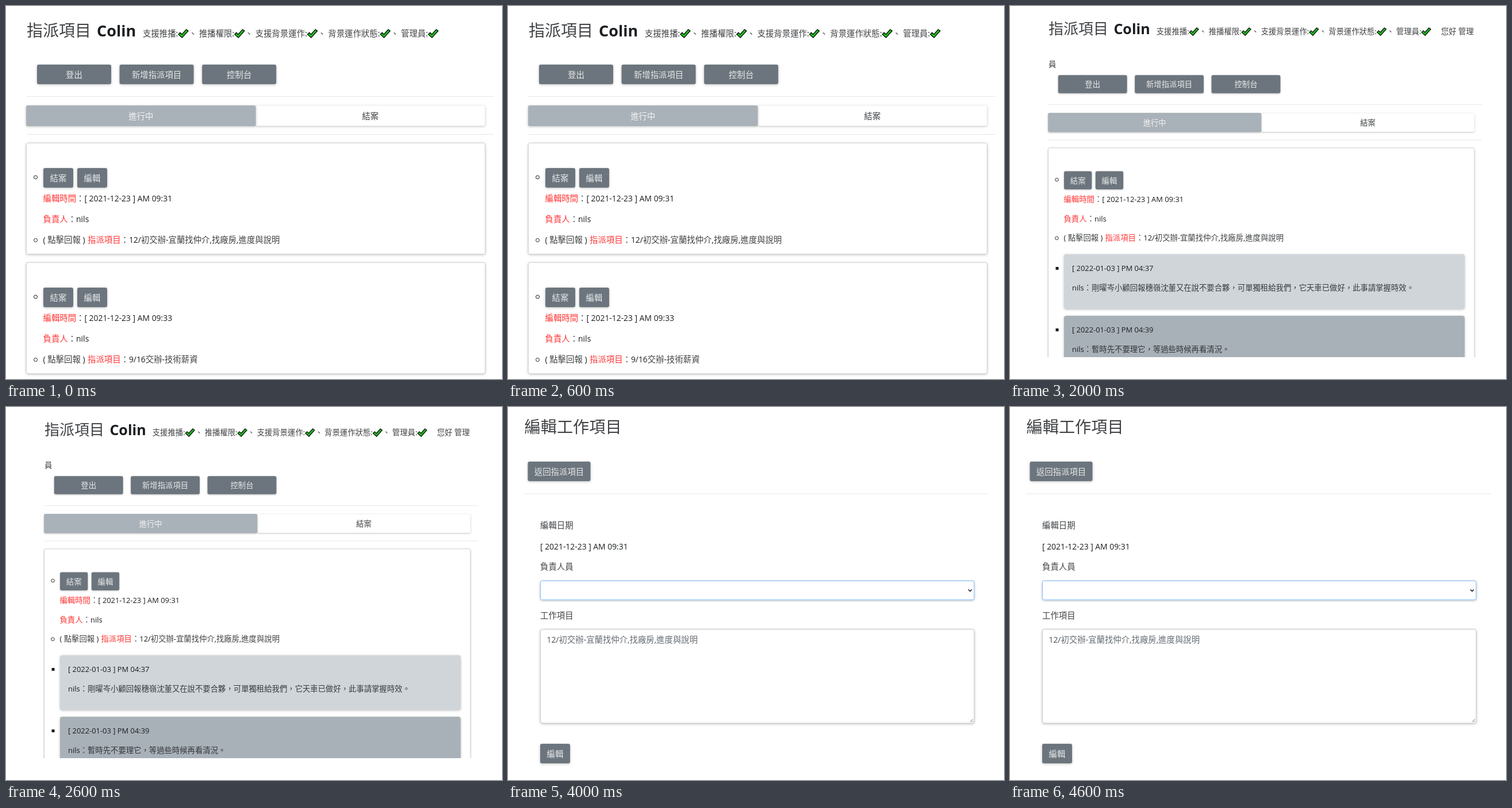
These frames come from a looping animation (863 by 649 pixels, 5 s). An HTML page:

```html
<!DOCTYPE html>
<html lang="zh-Hant">
<head>
<meta charset="utf-8">
<title>指派項目</title>
<style>
  html, body { margin: 0; width: 100%; height: 100%; overflow: hidden; background: #fff; }
  svg { display: block; width: 863px; height: 649px; }
  text { white-space: pre; }
  .ui { font-family: 'Open Sans', 'Noto Sans CJK TC', 'Noto Sans CJK', sans-serif; font-weight: 300; }
  .ui .l { font-size: .965em; font-weight: 400; }
  .ui .b .l { font-weight: 700; }
  .table { font-family: 'Liberation Sans', 'Noto Sans CJK TC', 'Noto Sans CJK', sans-serif; font-weight: 300; }
  .table .l, .table .m { font-weight: 400; }
  .ui text, .table text { fill-opacity: .84; }
  .ui .l, .table .l, .table .m { fill-opacity: 1; }
  .phone { font-family: Roboto, 'Noto Sans CJK TC', 'Noto Sans CJK', sans-serif; }
  .thin { font-weight: 300; }
  .medium { font-weight: 500; }
  .sh { filter: drop-shadow(0 1.5px 2px rgba(0, 0, 0, .26)); }
</style>
</head>
<body>
<svg id="stage" viewBox="0 0 863 649" xmlns="http://www.w3.org/2000/svg"></svg>
<script>
const INK = '#1b1e21', GREY = '#6c757d', PALE = '#aab2b9', RED = '#ff1010', DIM = '#8c8c8c';
const USER = 'nils', TASK = '12/初交辦-宜蘭找仲介,找廠房,進度與說明';

// Text is placed by the vertical middle of its line.
const text = (x, y, s, size = 14.4, fill = INK, cls = '', anchor = 'start') =>
  `<text x="${x}" y="${y + size * .35}" font-size="${size}" fill="${fill}" class="${cls}" text-anchor="${anchor}">` +
  s.replace(/[ -~]+/g, run => `<tspan class="l">${run}</tspan>`) + '</text>';
const mid = (x, y, s, size, fill, cls) => text(x, y, s, size, fill, cls, 'middle');
const rect = (x, y, w, h, fill, r = 0, more = '') =>
  `<rect x="${x}" y="${y}" width="${w}" height="${h}" rx="${r}" fill="${fill}" ${more}/>`;
const disc = (x, y, r, fill, more = '') => `<circle cx="${x}" cy="${y}" r="${r}" fill="${fill}" ${more}/>`;
const line = (d, stroke, w = 1, more = '') =>
  `<path d="${d}" fill="none" stroke="${stroke}" stroke-width="${w}" ${more}/>`;
const at = (x, y, body, scale = 1) => `<g transform="translate(${x} ${y}) scale(${scale})">${body}</g>`;
const rule = (x1, x2, y) => rect(x1, y, x2 - x1, 1, '#e6e6e6');
const clip = (id, x, y, w, h, body) =>
  `<clipPath id="${id}">${rect(x, y, w, h, '#000')}</clipPath><g clip-path="url(#${id})">${body}</g>`;

const button = (x, y, w, h, label, size = 14.4, fill = GREY, ink = '#fff') =>
  rect(x, y, w, h, fill, 3, 'class="sh"') + mid(x + w / 2, y + h / 2 + .8, label, size, ink);
const field = (x, y, w, h, stroke = '#d8d8d8') =>
  rect(x, y, w, h, '#fff', 3, `stroke="${stroke}" class="sh"`);

const tick = (x, y, s, dark) => at(x, y,
  `<path d="M0 .08 L.2 -.12 L.4 .08 L.88 -.46 L1.1 -.3 L.42 .46Z" fill="${dark ? INK : '#22bb22'}"
   stroke="${dark ? 'none' : '#0a1a0a'}" stroke-width=".09" stroke-linejoin="round"/>`, s);
const cross = (x, y, r, outlined) => {
  const d = `M${x - r} ${y - r}L${x + r} ${y + r}M${x + r} ${y - r}L${x - r} ${y + r}`;
  return (outlined ? line(d, '#1a0a0a', 5.6, 'stroke-linecap="square"') : '') +
    line(d, outlined ? '#f03a17' : '#e02f3d', outlined ? 3.4 : 2.6, 'stroke-linecap="square"');
};

// A row of "label: mark" pairs; labels ending in ! carry a cross.
function status(x, y, em, labels, dark, openEnd) {
  const markWidth = dark ? .95 : 1.25;
  return labels.map((raw, i) => {
    const label = raw.replace('!', '');
    const markX = x + (label.length + .3) * em;
    const last = i === labels.length - 1 && !openEnd;
    const out = text(x, y, label + ':', em) +
      (raw === label ? tick(markX, y, em * (dark ? .85 : 1.08), dark) : cross(markX + em * .62, y, em * .42)) +
      (last ? '' : text(markX + markWidth * em, y, '、', em));
    x += em * (label.length + markWidth + 1.55);
    return out;
  }).join('');
}

// ---- task list -------------------------------------------------------
const listHead = () => text(36, 43, '指派項目', 28) + text(158, 43, 'Colin', 28, INK, 'b') +
  status(238, 48, 14.4, ['支援推播', '推播權限', '支援背景運作', '背景運作狀態', '管理員']);

const listBar = () =>
  ['登出', '新增指派項目', '控制台'].map((s, i) => button(54 + i * 143.6, 102, 129, 34, s)).join('') +
  rule(36, 848, 157) +
  rect(434.5, 173.5, 399, 35, '#fff', 3, 'class="sh"') + mid(634, 192, '結案') +
  button(35, 173, 399.5, 36, '進行中', 14.4, PALE) + rule(36, 848, 223);

const ring = y => disc(51.5, y, 3, 'none', `stroke="${INK}"`);
const card = (y, h, time, task) => at(0, y,
  rect(35.5, .5, 798, h, '#fff', 3, 'stroke="#d6d6d6" class="sh"') +
  ring(60) + button(65, 44, 52, 34, '結案') + button(124, 44, 52, 34, '編輯') +
  text(64.5, 97, '編輯時間', 14.4, RED) + text(122, 97, `：[ 2021-12-23 ] AM ${time}`) +
  text(64.5, 133, '負責人', 14.4, RED) + text(107.7, 133, `：${USER}`) +
  ring(169.5) + text(64.5, 169, '( 點擊回報 )') +
  text(142, 169, '指派項目', 14.4, RED) + text(199.5, 169, `：${task}`));

const listPage = () => listHead() + listBar() +
  card(238, 193, '09:31', TASK) + card(446, 193, '09:33', '9/16交辦-技術薪資');

const note = (y, fill, time, message) =>
  rect(79.5, y + 22, 5, 5, INK) + rect(94, y, 697, 95, fill, 4, 'class="sh"') +
  text(108, y + 24.5, `[ 2022-01-03 ] PM ${time}`, 13.37) +
  text(108, y + 58, `${USER}：${message}`, 13.37);

const detailPage = () => at(33.6, 0, listHead(), .929) +
  text(750, 44.5, '您好 管理', 13.37) + text(67, 101, '員', 13.37) +
  clip('detail', 0, 60, 863, 551,
    at(33.6, 25.4, listBar() + card(238, 500, '09:31', TASK), .929) +
    note(432, '#d0d5da', '04:37', '剛曜岑小顧回報穗嶺沈董又在說不要合夥，可單獨租給我們，它天車已做好，此事請掌握時效。') +
    note(539, '#a9b1b8', '04:39', '暫時先不要理它，等過些時候再看清況。'));

// ---- report ----------------------------------------------------------
function reportPage() {
  const cols = [33.5, 94.5, 150.5, 503.5, 791.5, 831];
  const rows = [146.5, 245, 393.5, 449, 504.5, 560, 615.5, 671];
  const tasks = [TASK, '9/16交辦-技術薪資', '10/初交辦-曜岑三階段管制清單', '10/初交辦-曜岑異常清單', '12/17交辦-值夜值班增修', ''];
  const stack = (x, y, parts, cls) => parts.map((s, i) =>
    text(x, y + (i - (parts.length - 1) / 2) * 21.7, s, 14.4, '#111', cls)).join('');
  const fills = rows.slice(0, -1).map((y, i) =>
    rect(33.5, y, 797.5, rows[i + 1] - y, i === 0 ? '#a9b1b8' : i % 2 ? '#fff' : '#dcdcdc')).join('');
  const grid = line(cols.map(x => `M${x} 146V671`).join('') + rows.map(y => `M33 ${y}H831.5`).join(''), '#111');
  const heads = [['負責人', '員'], ['發布日', '期'], ['內容'], ['詳細內容'], ['是', '否', '結', '案']]
    .map((s, i) => stack(cols[i] + 6.5, 195.5, s, 'm')).join('');
  const body = tasks.map((task, i) => {
    const y = (rows[i + 1] + rows[i + 2]) / 2 + .5;
    const dates = stack(100.5, i === 5 ? 649 : y, ['2021-', '12-23']);
    return dates + (i === 5 ? '' : text(39.5, y, USER, 14.4, '#111') + text(157, y, task) + cross(807, y, 4.6, true));
  }).join('');
  const details = [
    [261.5, `[2022-01-03 16:37:44]${USER}:剛曜岑小顧回報`], [283.5, '穗嶺沈董又在說不要合夥，可單獨租給我'],
    [305, '們，它天車已做好，此事請掌握時效。'], [341, `[2022-01-03 16:39:01]${USER}:暫時先不要理`],
    [362.5, '它，等過些時候再看清況。'], [632, '[2022-01-03 16:32:04]halden:請回報到底']
  ].map(([y, s]) => text(510, y, s, 14.4, '#111')).join('');
  return '<g class="ui">' + text(34, 21, '報表', 28) +
    ['返回工作項目', '匯出Excel', '匯出Pdf'].map((s, i) => button(51 + i * 143.8, 83.5, 129.5, 34, s)).join('') +
    field(482.5, 81, 129.5, 34) + text(494, 98.5, '搜尋', 14.4, '#7d858c') + '</g>' +
    clip('report', 0, 140, 863, 497.5, fills + grid + heads + body + details);
}

// ---- edit form -------------------------------------------------------
const editPage = () => text(28.5, 35, '編輯工作項目', 28.2) +
  button(34.5, 95, 109, 34, '返回指派項目') + rule(27, 836, 150.5) +
  text(56, 206, '編輯日期') + text(56, 242.5, '[ 2021-12-23 ] AM 09:31') + text(56, 278, '負責人員') +
  field(56.5, 302.5, 754.5, 33, '#80bdff') + line('M801 317.5l3 3 3-3', '#222', 1.6) +
  text(56, 362.5, '工作項目') + field(56.5, 387, 754.5, 163, '#ccc') + text(67.5, 405, TASK, 14.4, '#495057') +
  line('M804 548l5-5M807 548l2-2', '#777') + button(56, 586, 52, 34, '編輯');

// ---- phones ----------------------------------------------------------
const alarm = (x, y) => disc(x, y, 3.3, 'none', 'stroke="#fff"') +
  line(`M${x} ${y - 2}v2.3h1.5M${x - 4.2} ${y - 2.5}l2-1.8M${x + 4.2} ${y - 2.5}l-2-1.8`, '#fff', .9);
const signal = (x, y) => text(x, y - 2, '4G', 5, '#fff', 'medium') +
  [0, 1, 2, 3].map(i => rect(x + 7 + i * 2.7, y + 1 - i * 1.6, 1.9, 2.5 + i * 1.6, '#fff')).join('') +
  rect(x + 20.5, y - 3.5, 15, 7, 'none', 2, 'stroke="#fff"') + rect(x + 36, y - 1.3, 1.3, 2.6, '#fff') +
  mid(x + 28, y, '70', 6, '#fff', 'medium');

const login = () => text(31.5, 127, '指派項目', 21.5) +
  status(38, 188.5, 10.75, ['支援推播', '推播權限', '支援背景運作'], true, true) +
  status(38, 205, 10.75, ['背景運作狀態', '管理員!'], true) +
  field(49, 228, 225, 26) + text(57, 240, '帳號', 10.8, '#757575') +
  field(49, 267, 225, 26) + text(57, 280, '密碼', 10.8, '#757575') +
  button(49, 306.5, 225.5, 26, '登入', 10.8) +
  rect(49.5, 349.5, 10.5, 10.5, '#fff', 2, 'stroke="#666"') + text(62.5, 354, '記住帳號與密碼', 10.8) +
  rule(31, 279, 379.5) + rect(155, 391.5, 124, 34, '#fff', 3, 'class="sh"') + mid(217, 408, '結案', 10.8) +
  button(31, 391.5, 124, 34, '進行中', 10.8, PALE, '#eee') + rule(31, 279, 437);

const loginPhone = () => text(35, 72, '上午8:47 | 23.0KB/s', 9.4, '#fff', 'medium') + alarm(122, 72) +
  disc(135, 72, 3.5, '#fff') + signal(236, 72) +
  '<path d="M21.5 453.5V91q0-11 11-11H277.5q11 0 11 11V453.5Z" fill="#fff"/>' + login();

const installPhone = () => text(307.5, 72, '上午8:46 | 194KB/s', 9.4, '#fff', 'medium') + alarm(392, 72) +
  '<path d="M400 74.5a2 2 0 0 1 1-3.6a3 3 0 0 1 5.5 0a2 2 0 0 1 1 3.6Z" fill="#fff"/>' + signal(507, 72) +
  rect(295.5, 82, 264, 37, '#1b1b1b') +
  line('M305.5 100l5-5 5 5M307 99v6h7v-6', DIM, 1.3) +
  rect(336.5, 98.5, 7, 6, DIM, 1) + line('M338 99v-2a2 2 0 0 1 4 0v2', DIM, 1.2) +
  text(350, 100, 't402x.github.io', 15.4, '#707070') + line('M475.5 99.5h11M481 94v11', DIM, 1.4) +
  rect(508, 94.5, 10.5, 10.5, 'none', 2, `stroke="${DIM}" stroke-width="1.3"`) + mid(513.3, 99.8, '3', 7, DIM) +
  [95, 99.5, 104].map(y => disc(540.5, y, 1.2, DIM)).join('') +
  rect(295.5, 119, 264, 365, '#fff') + at(273, 37.3, login()) + rect(295.5, 119, 264, 365, '#000', 0, 'opacity=".61"') +
  rect(301, 279, 251, 137, '#292c35', 14) +
  text(317.5, 304, '安裝應用程式', 20.8, '#f1f1f4') + rect(318, 336, 24, 24, '#dd0031') +
  text(349, 346, 'Zumek', 19, '#ececf0') + text(349, 367.5, 'quilm7t402x.github.io', 13.4, '#c6c7cc') +
  text(439.5, 398, '取消', 13, '#a9c4f7') + text(504, 398, '安裝', 13, '#a9c4f7');

const sun = (x, y, r) => disc(x, y, r * .5, '#fff') + [...Array(8)].map((_, i) => {
  const a = i * Math.PI / 4;
  return disc(x + r * Math.cos(a), y + r * Math.sin(a), r * .16, '#fff');
}).join('');
const chevron = (y, up) => disc(815, y, 8, '#0a0a0a') +
  line(up ? `M811.5 ${y + 2}l3.5-3.5 3.5 3.5` : `M811.5 ${y - 2}l3.5 3.5 3.5-3.5`, '#fff', 1.4);
const panel = (y, h) => rect(582, y, 252, h, '#252525', 9);
const bell = (x, y, fill) => `<path d="M${x - 4} ${y + 2}q1.2-1 1.2-3a2.8 2.8 0 0 1 5.6 0q0 2 1.2 3ZM${x - 1} ${y + 3}h2v1h-2Z" fill="${fill}"/>`;

const shadePhone = () => `<defs>
  <linearGradient id="wall" x2="0" y2="1"><stop stop-color="#777473"/><stop offset=".2" stop-color="#8b8888"/>
  <stop offset=".5" stop-color="#aaa9a9"/><stop offset="1" stop-color="#b3b2b2"/></linearGradient>
  <radialGradient id="blush"><stop stop-color="#b88a8c" stop-opacity=".4"/><stop offset="1" stop-color="#b88a8c" stop-opacity="0"/></radialGradient></defs>` +
  rect(574, 62, 267.5, 526, 'url(#wall)') + disc(632, 542, 44, 'url(#blush)') +
  text(582, 83, '8:48', 29.5, '#fff', 'thin') + text(582, 106, '11月1日 週二 上午', 9.6, '#fff') +
  text(582, 119.5, '青嶼電訊', 9.2, '#fff') + text(747.5, 119.5, '0.2KB/s', 9.4, '#fff', 'medium') +
  alarm(787, 119.5) + signal(795, 119.5) +
  disc(824, 98, 4.3, 'none', 'stroke="#fff" stroke-width="1.7"') +
  disc(824, 98, 5.5, 'none', 'stroke="#fff" stroke-width="1.5" stroke-dasharray="2.2 2.12"') + disc(824, 98, 1.2, '#fff') +
  panel(133, 85) + [613, 660, 708, 755, 802].map((x, i) => disc(x, 164, 17, i < 2 ? '#0c78d2' : '#3f3f3f')).join('') +
  line('M608 166a5.5 5.5 0 1 1 3 3.5M610.5 164.5h5v3.5h-5zM611.5 164v-2a1.5 1.5 0 0 1 3 0v2', '#fff', 1.1) +
  line('M657.5 169v-10l-2 2M662.5 159v10l2-2', '#fff', 1.3) +
  line('M702 162a8.5 8.5 0 0 1 12 0M704 164.5a5.6 5.6 0 0 1 8 0M706 167a2.8 2.8 0 0 1 4 0', '#fff', 1.4) + disc(708, 168.5, 1.1, '#fff') +
  rect(749.5, 159.5, 11, 9, '#fff', 2) + rect(751, 163, 8, 1.6, '#3f3f3f') +
  line('M799 161h6l-1.5 3v5h-3v-5zM802 157v2M797.5 158l1.3 1.3M806.5 158l-1.3 1.3', '#fff', 1.1) +
  rect(592, 195, 232, 1, '#3b3b3b') + disc(597, 206.5, 5, '#777') + line('M597 203.5v3l2 1', '#2a2a2a') +
  text(607, 206.5, '今日:897.7MB', 10.7, '#9b9b9b') + text(694, 206.5, '本月:897.7...', 10.7, '#9b9b9b') +
  text(771.5, 206.5, '設定套餐 >', 10.9, '#9b9b9b') +
  panel(226, 30) + '<path d="M632 226H591q-9 0-9 9v12q0 9 9 9h41Z" fill="#a2a2a2"/>' + sun(597, 241, 4.6) + sun(819, 241, 6) +
  rect(694, 266.5, 27, 3, '#d0d0d0', 1.5) +
  panel(279, 91) + disc(601, 298, 8.3, '#fff') + bell(601, 298, '#222') +
  text(617, 298.5, 'Zumek・quilm7t4…', 10.2, '#858585') + text(711, 298.5, '・現在', 10.2, '#858585') + bell(750, 298.5, '#858585') +
  text(617, 324, '需求通知', 15.5, '#fff') + text(617, 348, 'ttt1', 12.8, '#858585') +
  disc(779, 306, 16.5, '#9a9a9a') + mid(779, 306.5, 'Q', 13.5, '#fff', 'medium') + chevron(298, true) +
  panel(375, 64) + disc(601, 406, 8.3, '#fff') + disc(601, 406, 4.5, '#333') +
  text(617, 399, 'Zumek', 15.5, '#fff', 'medium') + text(617, 417.5, '輕觸即可複製這個應用程式..', 13.4, '#858585') + chevron(406) +
  panel(443, 64) + disc(601, 475, 8.3, '#fff') + '<path d="M601 470l5 9h-10Z" fill="#222"/>' + rect(600.5, 473.5, 1, 3, '#fff') +
  text(617, 467.5, '敬請處理帳戶..', 15.5, '#fff', 'medium') + text(727, 469.5, '・3天', 10.2, '#858585') +
  text(617, 487, '728306194@mexo.tvb...', 13, '#858585') + disc(779, 475, 15, '#fff') + disc(779, 475, 9.5, '#4285f4') + chevron(475) +
  disc(707.5, 556.5, 17.5, '#3a3a3a') + line('M703.5 552.5l8 8M711.5 552.5l-8 8', '#fff', 1.3);

const phonesPage = () => rect(0, 0, 863, 649, '#000') + loginPhone() + installPhone() + shadePhone();

// ---- playback --------------------------------------------------------
const HOLD = 1000;
const pages = [['ui', listPage], ['phone', phonesPage], ['ui', detailPage], ['table', reportPage], ['ui', editPage]];
const stage = document.getElementById('stage');
stage.innerHTML = pages.map(([cls, draw]) => `<g class="${cls}" display="none">${draw()}</g>`).join('');
const scenes = [...stage.children];
const start = performance.now();

function show(ms) {
  const current = Math.floor(ms / HOLD) % scenes.length;
  scenes.forEach((g, i) => g.setAttribute('display', i === current ? 'inline' : 'none'));
}
function play() {
  show(performance.now() - start);
  requestAnimationFrame(play);
}
play();
</script>
</body>
</html>
```
